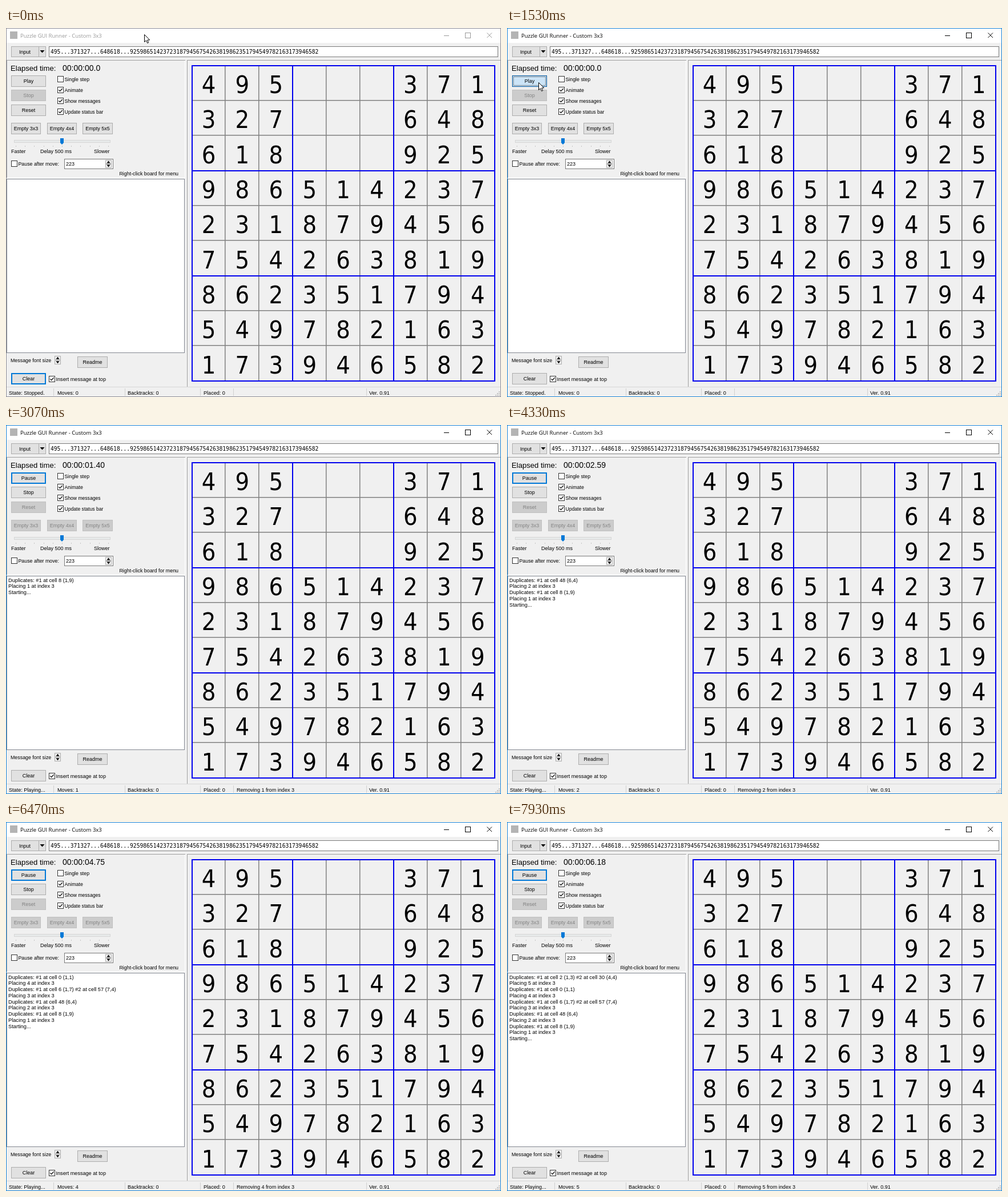
Recreate the animation shown at these times as an HTML page with a canvas. Size 867x646 px, loop 8000 ms.

```html
<!DOCTYPE html>
<html lang="en">
<head>
<meta charset="utf-8">
<title>Puzzle GUI Runner</title>
<style>
  html, body { margin: 0; width: 100%; height: 100%; overflow: hidden; background: #f0f0f0; }
  canvas { display: block; }
</style>
</head>
<body>
<canvas id="stage" width="867" height="646"></canvas>
<script>
const ctx = document.getElementById('stage').getContext('2d');
const LOOP = 8000;
const CLICK = 1530, PLAY = 1600;
const FIRST_MOVE = 2150, MOVE_PERIOD = 1250, HOLD = 520;
const TARGET = 3;
const PUZZLE = '495...371327...648618...925986514237231879456754263819862351794549782163173946582';
const CLOCK = [[1670, 0.02], [3070, 1.40], [4330, 2.59], [5600, 3.87], [6470, 4.75], [7930, 6.18]];
const UI = '"Liberation Sans", Arial, sans-serif';
const TITLE = '"Open Sans", "Noto Sans", sans-serif';
const MONO = '"DejaVu Sans Mono", monospace';
const DIGITS = '"DejaVu Sans Condensed", "Noto Sans", sans-serif';
const BLUE = '#0078d7', FACE = '#f0f0f0';

function rect(x, y, w, h, fill) {
  ctx.fillStyle = fill;
  ctx.fillRect(x, y, w, h);
}

function frame(x, y, w, h, fill, line, weight = 1) {
  rect(x, y, w, h, line);
  rect(x + weight, y + weight, w - 2 * weight, h - 2 * weight, fill);
}

function text(str, x, y, size = 9, color = '#000', align = 'left', family = UI) {
  ctx.font = `${size}px ${family}`;
  ctx.textAlign = align;
  ctx.fillStyle = color;
  ctx.fillText(str, x, y);
}

function poly(points, fill, stroke) {
  ctx.beginPath();
  points.forEach(([x, y]) => ctx.lineTo(x, y));
  ctx.closePath();
  ctx.fillStyle = fill;
  ctx.fill();
  if (stroke) {
    ctx.strokeStyle = stroke;
    ctx.lineWidth = 1;
    ctx.stroke();
  }
}

function path(points, color, width = 1) {
  ctx.beginPath();
  points.forEach(([x, y]) => ctx.lineTo(x, y));
  ctx.strokeStyle = color;
  ctx.lineWidth = width;
  ctx.stroke();
}

const BUTTON_STYLES = {
  normal: ['#e1e1e1', '#adadad', 1],
  disabled: ['#cccccc', '#bfbfbf', 1],
  focused: ['#e1e1e1', BLUE, 2],
  warming: ['#e3e9ee', '#5793c2', 1],
  hover: ['#e5f1fb', BLUE, 1],
  pressed: ['#cce4f7', '#005499', 1]
};

function button(label, x, y, w, style = 'normal') {
  const [fill, line, weight] = BUTTON_STYLES[style];
  frame(x, y, w, 20, fill, line, weight);
  if (style === 'pressed') {
    ctx.setLineDash([1, 1]);
    ctx.lineWidth = 1;
    ctx.strokeStyle = '#333';
    ctx.strokeRect(x + 2.5, y + 2.5, w - 5, 15);
    ctx.setLineDash([]);
  }
  text(label, x + w / 2, y + 13, 9, style === 'disabled' ? '#838383' : '#000', 'center');
}

function checkbox(label, x, y, checked, size) {
  frame(x, y, 11, 11, '#fff', '#333');
  if (checked) path([[x + 2.5, y + 5.5], [x + 4.5, y + 7.7], [x + 8.7, y + 3]], '#000', 1.2);
  text(label, x + 12.5, y + 9, size);
}

function spinner(x, y, h) {
  const half = h / 2;
  frame(x, y, 11, half, FACE, '#adadad');
  frame(x, y + half, 11, half, FACE, '#adadad');
  const mid = x + 5.5, up = y + half / 2, down = y + half * 1.5;
  poly([[mid - 3, up + 2], [mid + 3, up + 2], [mid, up - 2]], '#000');
  poly([[mid - 3, down - 2], [mid + 3, down - 2], [mid, down + 2]], '#000');
}

function clockAt(t) {
  if (t < CLOCK[0][0]) return '00:00:00.0';
  let i = 1;
  while (i < CLOCK.length - 1 && t > CLOCK[i][0]) i++;
  const [t0, s0] = CLOCK[i - 1], [t1, s1] = CLOCK[i];
  const seconds = s0 + (s1 - s0) * (t - t0) / (t1 - t0);
  return '00:00:' + seconds.toFixed(2).padStart(5, '0');
}

function duplicatesOf(digit) {
  return [...PUZZLE].flatMap((d, i) =>
    d === String(digit) && (i < 9 || i % 9 === TARGET) ? [i] : []);
}

function solverAt(t) {
  const move = Math.max(0, Math.floor((t - FIRST_MOVE) / MOVE_PERIOD) + 1);
  const since = t - FIRST_MOVE - (move - 1) * MOVE_PERIOD;
  const placed = move > 0 && since < HOLD;
  const log = t >= PLAY ? ['Starting...'] : [];
  for (let n = 1; n <= move; n++) {
    const found = duplicatesOf(n).map((cell, i) =>
      `#${i + 1} at cell ${cell} (${Math.floor(cell / 9) + 1},${cell % 9 + 1})`);
    log.unshift(`Duplicates: ${found.join(' ')}`, `Placing ${n} at index ${TARGET}`);
  }
  const hint = !move ? '' : placed ? `Placing ${move} at index ${TARGET}`
    : `Removing ${move} from index ${TARGET}`;
  return { move, placed, log, hint };
}

function cursorAt(t) {
  if (t >= 1130) return [55, 95];
  if (t >= 1070) return [56, 92];
  const p = Math.min(1, Math.max(0, (t - 340) / 590));
  const e = p * p * (3 - 2 * p);
  return [242 - 184 * e, 11 + 77 * e];
}

function drawCursor([x, y]) {
  const shape = [[0, 0], [0, 13], [3, 10.3], [5.2, 15], [7.2, 14], [5.2, 9.6], [9.2, 9.4]];
  poly(shape.map(([dx, dy]) => [x + dx + 0.5, y + dy + 0.5]), '#fff', '#000');
}

function drawTitle(active) {
  const ink = active ? '#000' : '#999';
  rect(0, 0, 867, 26, '#fff');
  rect(7, 6, 13, 13, '#b4b4b4');
  text('Puzzle GUI Runner - Custom 3x3', 25, 17, 9.5, ink, 'left', TITLE);
  rect(767, 13, 9, 1, ink);
  frame(804, 8, 10, 10, '#fff', ink);
  path([[842.5, 8.5], [851, 17]], ink);
  path([[851, 8.5], [842.5, 17]], ink);
}

function drawToolbar(cursorY, moving) {
  frame(9, 32, 61, 19, '#e1e1e1', '#adadad');
  rect(57, 33, 1, 17, '#adadad');
  text('Input', 33, 45, 9, '#000', 'center');
  poly([[59.5, 39], [67.5, 39], [63.5, 43.5]], '#000');
  const hovered = moving && cursorY >= 32 && cursorY < 51;
  frame(75, 32, 787, 19, '#fff', hovered ? '#171717' : '#7a7a7a');
  text(PUZZLE, 78, 44.5, 9.64, '#000', 'left', MONO);
}

function drawControls(t) {
  const playing = t >= PLAY;
  const idle = playing ? 'disabled' : 'normal';
  rect(1, 56, 313, 1, '#a0a0a0');
  rect(1, 56, 1, 207, '#a0a0a0');
  rect(313, 57, 1, 206, '#fff');
  rect(1, 262, 313, 1, '#fff');

  text('Elapsed time:', 8, 75, 13.1);
  text(clockAt(t), 99, 75, 14);

  const playStyle = playing ? 'focused' : t >= CLICK ? 'pressed'
    : t >= 1130 ? 'hover' : t >= 1070 ? 'warming' : 'normal';
  button(playing ? 'Pause' : 'Play', 9, 83, 61, playStyle);
  button('Stop', 9, 108, 61, playing ? 'normal' : 'disabled');
  button('Reset', 9, 134, 61, idle);
  button('Empty 3x3', 9, 166, 52, idle);
  button('Empty 4x4', 72, 166, 52, idle);
  button('Empty 5x5', 134, 166, 53, idle);

  checkbox('Single step', 90, 84, false, 8.8);
  checkbox('Animate', 90, 103, true, 8.8);
  checkbox('Show messages', 90, 122, true, 8.6);
  checkbox('Update status bar', 90, 141, true, 8.6);

  frame(14, 196, 169, 5, '#e7eaea', '#d6d6d6');
  for (let i = 0; i <= 10; i++) rect(Math.round(17 + i * 16.2), 206, 1, 2, '#c4c4c4');
  poly([[95, 193], [101, 193], [101, 201], [98, 204], [95, 201]], BLUE);
  text('Faster', 9, 219);
  text('Delay 500 ms', 60, 219, 9);
  text('Slower', 154, 219);

  checkbox('Pause after move:', 9, 232, false, 8.8);
  frame(102, 229, 86, 18, '#fff', '#7a7a7a');
  text('223', 105, 241);
  spinner(174, 231, 14);
  text('Right-click board for menu', 302, 258, 8.9, '#000', 'right');
}

function drawMessages(log, clearFocused) {
  frame(1, 264, 312, 305, '#fff', '#828790');
  log.forEach((line, i) => text(line, 4, 274.5 + i * 10.75, 9.25));
  text('Message font size', 8, 585, 8.85);
  spinner(85, 574, 15);
  button('Readme', 125, 575, 53);
  button('Clear', 9, 604, 61, clearFocused ? 'focused' : 'normal');
  checkbox('Insert message at top', 75, 609, true, 9.1);
}

function drawBoard({ move, placed }) {
  const gx = i => Math.floor(325 + 58.9 * i);
  const gy = i => Math.floor(65 + 61.35 * i);
  rect(317, 56, 550, 1, '#a0a0a0');
  rect(317, 56, 1, 572, '#a0a0a0');

  if (placed) {
    for (const cell of duplicatesOf(move)) {
      const c = cell % 9, r = Math.floor(cell / 9);
      rect(gx(c), gy(r), gx(c + 1) - gx(c), gy(r + 1) - gy(r), '#ffa0a0');
    }
  }
  for (const major of [false, true]) {
    for (let i = 0; i < 10; i++) {
      if ((i % 3 === 0) !== major) continue;
      const color = major ? '#0000ee' : '#808080', weight = major ? 2 : 1.5;
      rect(gx(i), 65, weight, 554, color);
      rect(325, gy(i), 532, weight, color);
    }
  }
  [...PUZZLE].forEach((given, i) => {
    const digit = i === TARGET && placed ? String(move) : given;
    if (digit === '.') return;
    const x = 355 + 58.9 * (i % 9), y = 114 + 61.35 * Math.floor(i / 9);
    text(digit, x, y, 43, '#000', 'center', DIGITS);
  });
}

function drawStatus(t, { move, placed, hint }) {
  rect(0, 628, 867, 1, '#d7d7d7');
  [83, 208, 340, 398, 631].forEach(x => rect(x, 631, 1, 13, '#d0d0d0'));
  const label = (str, x) => text(str, x, 641.5, 9.1);
  label(t >= PLAY ? 'State: Playing...' : 'State: Stopped.', 5);
  label(`Moves: ${move}`, 90);
  label('Backtracks: 0', 213);
  label(`Placed: ${placed ? 1 : 0}`, 346);
  label(hint, 404);
  label('Ver. 0.91', 636);
  for (let r = 0; r < 3; r++) {
    for (let c = 2 - r; c < 3; c++) rect(857 + c * 3, 636 + r * 3, 2, 2, '#bfbfbf');
  }
}

function draw(t) {
  const active = t >= CLICK;
  const solver = solverAt(t);
  const cursor = cursorAt(t);
  rect(0, 0, 867, 646, FACE);
  drawTitle(active);
  drawToolbar(cursor[1], t < CLICK);
  drawControls(t);
  drawMessages(solver.log, !active);
  drawBoard(solver);
  drawStatus(t, solver);
  ctx.strokeStyle = active ? '#1883d7' : '#8c8c96';
  ctx.lineWidth = 1;
  ctx.strokeRect(0.5, 0.5, 866, 645);
  if (t < PLAY) drawCursor(cursor);
}

// The picture advances in steps of a fifteenth of a second.
const start = performance.now();
function tick() {
  const elapsed = (performance.now() - start) % LOOP;
  const step = Math.floor((elapsed + 5) * 0.015) % 120;
  draw(Math.round(step * 100 / 15) * 10);
  requestAnimationFrame(tick);
}
tick();
</script>
</body>
</html>
```
